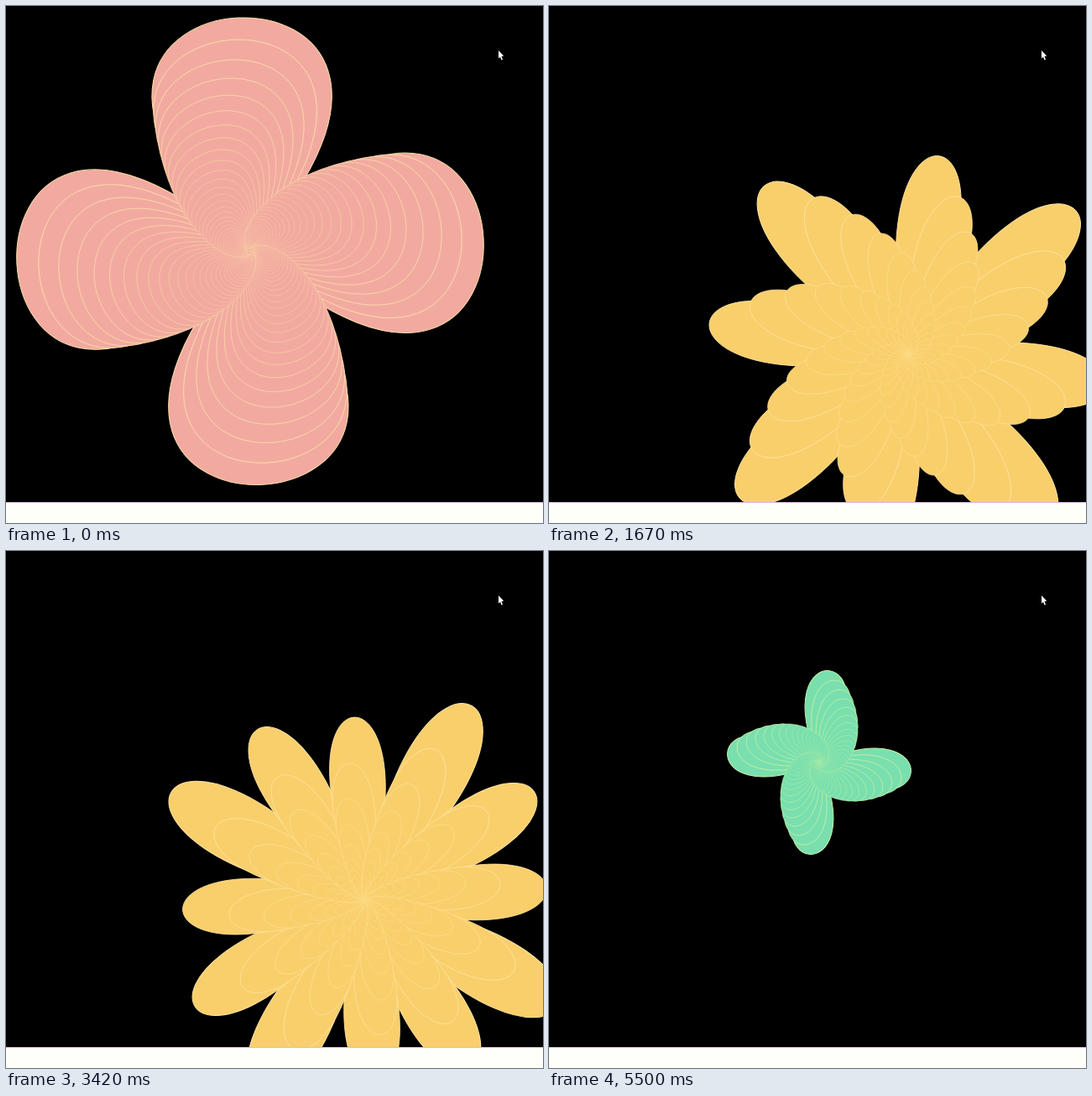
Animation, 640 px wide and 616 px high, one loop 5.58 s. Source, as an HTML page with a canvas:

```html
<!DOCTYPE html>
<html>
<head>
<meta charset="utf-8">
<style>
html, body { margin: 0; width: 100%; height: 100%; overflow: hidden; background: #000; }
canvas { display: block; }
</style>
</head>
<body>
<canvas id="stage" width="640" height="616"></canvas>
<script>
const ctx = document.getElementById('stage').getContext('2d');
const LOOP = 5580, FPS = 12, LAYERS = 46, SHRINK = 0.908;

// twist: degrees between neighbouring layers at step `at`, changing by `rate` per step
const flowers = [
  { from: 0, x: 291, y: 292.2, size: 278.5, width: 1, fill: '#f2aaa0', line: '#fae0a8',
    at: 0, twist: -3.05, rate: -2.315 },
  { from: 13, x: 427.5, y: 415, size: 263.5, width: 0.395, fill: '#f9cf6c', line: '#ffe5a2',
    at: 20, twist: -40.45, rate: -0.985 },
  { from: 45, x: 322, y: 252, size: 110, width: 0.58, fill: '#79dfae', line: '#c4efa2',
    at: 47, twist: -67.9, rate: -0.834 }
];

// Each petal is one closed cubic whose tip lies at 3/4 of its handle height.
function petals(size, width) {
  const h = size / 0.75, w = h * width;
  for (let i = 0; i < 4; i++) {
    ctx.beginPath();
    ctx.moveTo(0, 0);
    ctx.bezierCurveTo(-w, -h, w, -h, 0, 0);
    ctx.fill();
    ctx.stroke();
    ctx.rotate(Math.PI / 2);
  }
}

function drawFlower(f, step) {
  const twist = (f.twist + f.rate * (step - f.at)) * Math.PI / 180;
  ctx.save();
  ctx.translate(f.x, f.y);
  ctx.fillStyle = f.fill;
  ctx.strokeStyle = f.line;
  for (let k = 0, s = 1; k < LAYERS; k++, s *= SHRINK) {
    ctx.rotate(twist);
    ctx.lineWidth = Math.max(0.3, s);
    petals(f.size * s, f.width);
  }
  ctx.restore();
}

function drawCursor() {
  ctx.fillStyle = '#fff';
  ctx.beginPath();
  [[587, 53], [587, 62.5], [589, 60.7], [590.6, 64.4], [592, 63.7], [590.5, 60], [593.2, 59.6]]
    .forEach(p => ctx.lineTo(...p));
  ctx.fill();
}

function draw(now) {
  const step = Math.floor((now % LOOP + 3.4) * FPS / 1000);
  ctx.fillStyle = '#000';
  ctx.fillRect(0, 0, 640, 616);
  drawFlower(flowers.filter(f => f.from <= step).pop(), step);
  ctx.fillStyle = '#fffffa';
  ctx.fillRect(0, 591, 640, 25);
  ctx.fillStyle = '#e0b0e0';
  ctx.fillRect(0, 591, 640, 1);
  drawCursor();
}

const start = performance.now();
function tick() {
  draw(performance.now() - start);
  requestAnimationFrame(tick);
}
tick();
</script>
</body>
</html>
```
